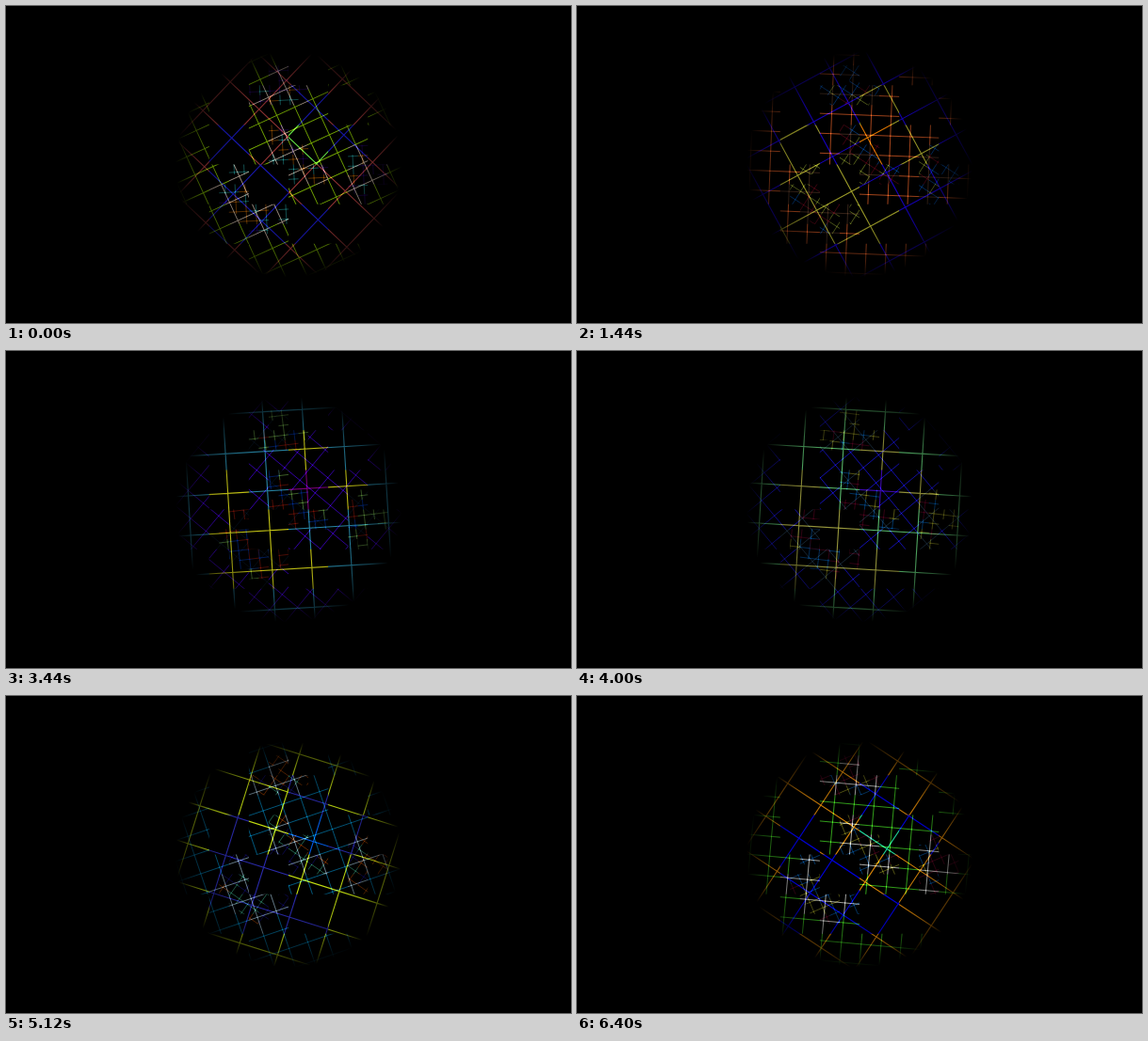
Animation, 600 px wide and 337 px high, one loop 6.48 s. Source, as an HTML page with a canvas:

```html
<!DOCTYPE html>
<html lang="en">
<head>
<meta charset="utf-8">
<title>Rotating grids</title>
<style>
html, body { margin: 0; height: 100%; overflow: hidden; background: #000; }
canvas { display: block; }
</style>
</head>
<body>
<canvas id="stage" width="600" height="337"></canvas>
<script>
const ctx = document.getElementById('stage').getContext('2d');
const LOOP = 6480, STEP = 80, PERIOD = 7.2;
const RADIUS = 120, CELL = 337 / 8, CX = 300, CY = 168.5;

// Seconds at which red, green and blue are brightest
const CORE = [1.8, 7, 5.1], BAND = [2.7, 2.7, 6.2], OUTER = [5.9, 4.9, 2.3];
const COOL = [1.3, 6.8, 3.9], WARM = [6.6, 6.3, 6.1];
const TINY = [0, 1, 2].map(n => [0, 1, 2].map(c => 2.4 * n - 1.6 * c));

const between = (v, lo, hi) => v >= lo && v <= hi;
const hash = (i, j) => {
  const n = Math.sin(i * 12.9898 + j * 78.233) * 43758.5453;
  return n - Math.floor(n);
};

// Cells count right and up from the centre; every rule mirrors in the diagonal
function splits(i, j) {
  const sum = i + j, gap = Math.abs(i - j);
  return gap > 2 ? !between(sum, -1, 0) : Math.abs(sum) !== 2 && sum > -5;
}

function splitsAgain(i, j) {
  if (!splits(i >> 1, j >> 1)) return false;
  const sum = i + j, gap = Math.abs(i - j);
  return gap > 2
    ? gap <= 5 && Math.max(i, j) >= 3 && between(sum, 1, 3)
    : between(sum, -6, -4) || between(sum, -1, 0);
}

const paletteOf = [
  (i, j) => {
    const sum = i + j, lo = Math.min(i, j), hi = Math.max(i, j);
    if (lo === 0 && hi === 0) return CORE;
    const inBand = lo >= 0 ? sum === 1 : lo >= -2 && hi <= 0 && sum <= -2;
    return inBand ? BAND : OUTER;
  },
  (i, j) => splits(i >> 1, j >> 1) && (splitsAgain(i, j) ? WARM : COOL),
  (i, j) => splitsAgain(i >> 1, j >> 1) &&
    TINY[Math.floor(hash(i + j, Math.abs(i - j)) * 4)]
];

// Each level halves the cells, turns faster and gets thinner and dimmer
const levels = paletteOf.map((pick, n) => {
  const size = CELL / 2 ** n, count = 3 * 2 ** n;
  const regions = new Map(), grid = new Path2D();
  for (let i = -count; i < count; i++) {
    for (let j = -count; j < count; j++) {
      const palette = pick(i, j);
      if (!palette) continue;
      if (!regions.has(palette)) regions.set(palette, new Path2D());
      regions.get(palette).rect(i * size, -(j + 1) * size, size, size);
    }
  }
  for (let p = size / 2; p < RADIUS; p += size) {
    const half = Math.sqrt(RADIUS * RADIUS - p * p);
    for (const q of [-p, p]) {
      grid.moveTo(q, -half); grid.lineTo(q, half);
      grid.moveTo(-half, q); grid.lineTo(half, q);
    }
  }
  return { regions, grid, turn: 1 + n / 2, width: 1.1 - 0.2 * n, gain: 0.9 - 0.2 * n };
});

function colorAt(peaks, t, gain) {
  const channels = peaks.map(peak => {
    const wave = 0.5 + 0.5 * Math.cos((t - peak) / PERIOD * 2 * Math.PI);
    return Math.round(255 * gain * wave ** 1.2);
  });
  return `rgb(${channels})`;
}

const fade = ctx.createRadialGradient(0, 0, 0, 0, 0, RADIUS);
for (let r = 0; r <= 1; r += 0.125) fade.addColorStop(r, `rgba(0,0,0,${r ** 4})`);

function draw(t) {
  const angle = (43.5 + 12.5 * t) * Math.PI / 180;
  ctx.setTransform(1, 0, 0, 1, CX, CY);
  ctx.fillStyle = '#000';
  ctx.fillRect(-CX, -CY, 600, 337);
  ctx.globalCompositeOperation = 'lighter';
  for (const { regions, grid, turn, width, gain } of levels) {
    ctx.lineWidth = width;
    for (const [palette, region] of regions) {
      ctx.save();
      ctx.clip(region);
      ctx.rotate(angle * turn);
      ctx.strokeStyle = colorAt(palette, t, gain);
      ctx.stroke(grid);
      ctx.restore();
    }
  }
  ctx.globalCompositeOperation = 'source-over';
  ctx.fillStyle = fade;
  ctx.fillRect(-CX, -CY, 600, 337);
}

function tick() {
  const t = performance.now() % LOOP;
  draw(Math.floor(t / STEP) * STEP / 1000);
  requestAnimationFrame(tick);
}
tick();
</script>
</body>
</html>
```
